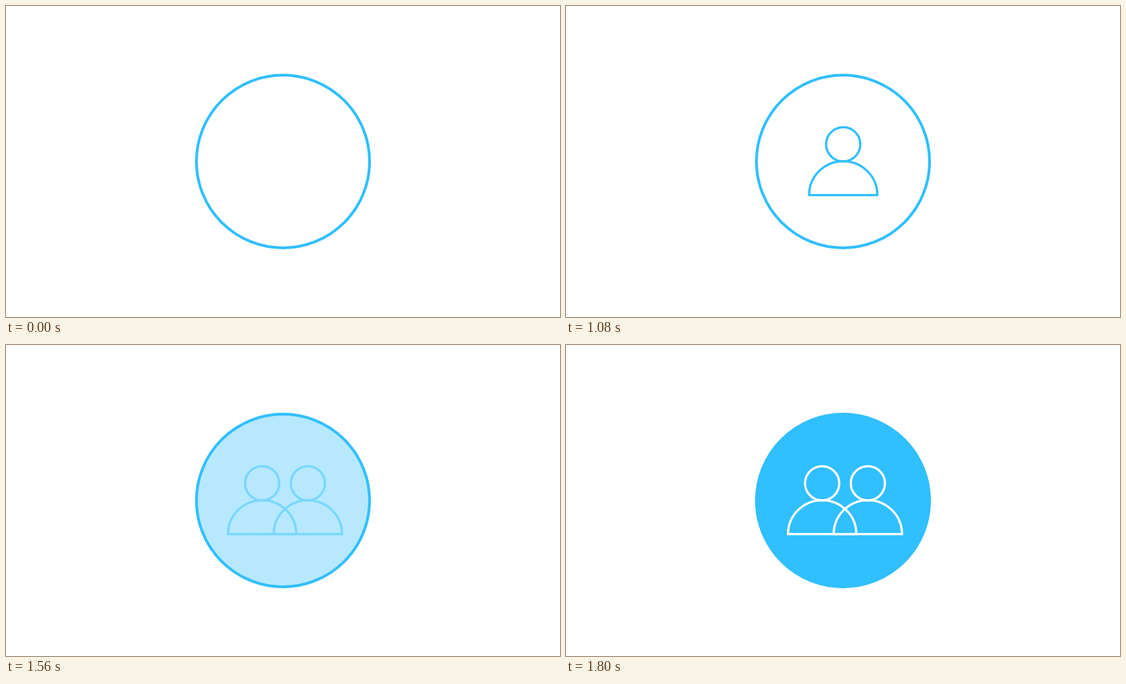
Animation of 800 by 450 pixels, one loop 2600 ms. Source, as an HTML page:

```html
<!DOCTYPE html>
<html lang="en">
<head>
<meta charset="utf-8">
<title>Add a contact</title>
<style>
  html, body { margin: 0; width: 100%; height: 100%; overflow: hidden; background: #fff; }
  svg { display: block; width: 100vw; height: 100vh; }
</style>
</head>
<body>
<svg viewBox="0 0 800 450" fill="none" stroke-width="3.3">
  <defs>
    <g id="person">
      <circle cy="200.1" r="24.7"/>
      <path d="M-49.3 273.6a49.3 49 0 0 1 98.6 0z"/>
    </g>
  </defs>
  <circle id="disc" cx="400" cy="225" r="125" stroke="#30bfff" stroke-width="4"/>
  <g id="icons">
    <use id="first" href="#person"/>
    <use id="second" href="#person"/>
    <path id="plus" d="M-21.5 0h43M0-21.5v43"/>
  </g>
</svg>
<script>
const LOOP = 2600, STEP = 40;
const BLUE = [48, 191, 255], WHITE = [255, 255, 255];
const [disc, first, second, plus, icons] =
  ['disc', 'first', 'second', 'plus', 'icons'].map(id => document.getElementById(id));

const span = (t, from, to) => Math.min(1, Math.max(0, (t - from) / (to - from)));
const smooth = p => p * p * (3 - 2 * p);
const lerp = (a, b, p) => a + (b - a) * p;
const mix = (a, b, p) => `rgb(${a.map((v, i) => Math.round(lerp(v, b[i], p)))})`;

function place(el, x, y, opacity, scale = 1) {
  el.setAttribute('transform', `translate(${x} ${y}) scale(${scale})`);
  el.setAttribute('opacity', opacity);
}

function draw(t) {
  const appear = span(t, 0, 400);
  const leave = span(t, 600, 880);
  const slide = span(t, 1080, 1480) ** 2;
  const flip = smooth(span(t, 1400, 1800));

  place(plus, 454.4, 171.2, appear * (1 - leave), lerp(1, 1.8, leave));
  place(first, lerp(400.3, 369.9, slide), 0, appear);
  place(second, lerp(482.5, 435.9, slide), 0, smooth(span(t, 1080, 1280)));
  disc.setAttribute('fill', mix(WHITE, BLUE, flip));
  icons.setAttribute('stroke', mix(BLUE, WHITE, flip));
}

const start = performance.now();
function tick() {
  const t = (performance.now() - start) % LOOP;
  draw(Math.floor(t / STEP) * STEP);
  requestAnimationFrame(tick);
}
tick();
</script>
</body>
</html>
```
